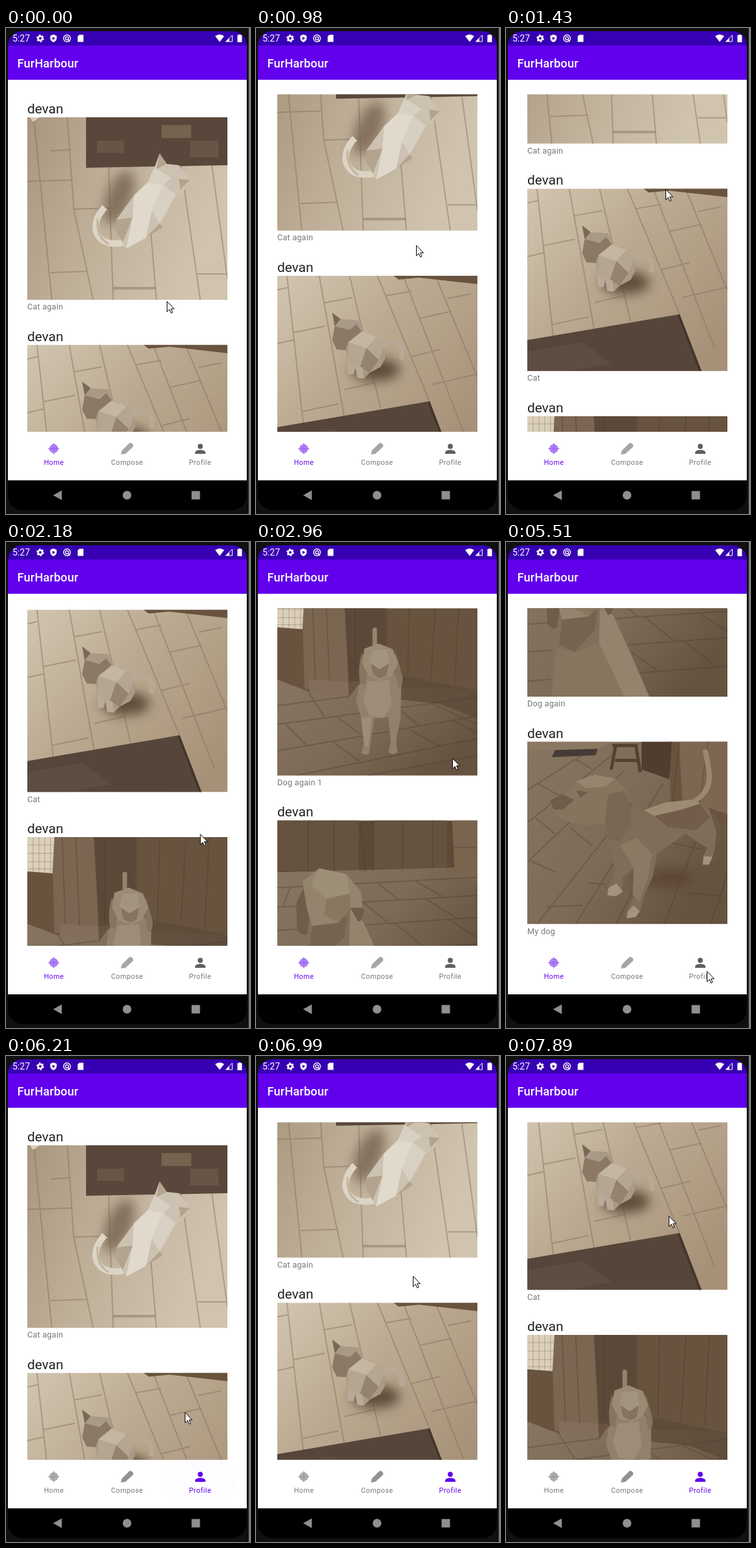
An HTML page that plays this animation: 378x751 px, repeating every 8000 ms.

```html
<!DOCTYPE html>
<html lang="en">
<head>
<meta charset="utf-8">
<title>Pet feed</title>
<style>
html, body { margin: 0; width: 100%; height: 100%; overflow: hidden; background: #101010; }
#stage { display: block; width: 378px; height: 751px; }
text { font-family: Roboto, sans-serif; }
.name { font-size: 21px; fill: #212121; }
.caption { font-size: 12.7px; letter-spacing: .23px; fill: #757575; }
.tab { font-size: 10.9px; letter-spacing: .45px; text-anchor: middle; fill: #757575; }
.tab.on { fill: #6200ee; }
.seam { fill: none; stroke: #806c56; stroke-width: 2; opacity: .45; }
.dark { stroke: #4b3b2f; opacity: .35; }
</style>
</head>
<body>
<svg id="stage" viewBox="0 0 378 751">
  <defs>
    <linearGradient id="lightFloor" x1="0" y1="0" x2="1" y2=".35">
      <stop offset="0" stop-color="#a8967e"/><stop offset=".4" stop-color="#bcac95"/><stop offset="1" stop-color="#d0c4af"/>
    </linearGradient>
    <linearGradient id="catFloor" x1="0" y1="0" x2="1" y2=".8">
      <stop offset="0" stop-color="#d2c6b1"/><stop offset=".45" stop-color="#bbaa91"/><stop offset="1" stop-color="#a69178"/>
    </linearGradient>
    <linearGradient id="dimFloor" x1="0" y1="0" x2="1" y2=".6">
      <stop offset="0" stop-color="#877561"/><stop offset=".55" stop-color="#7d6a57"/><stop offset="1" stop-color="#65523f"/>
    </linearGradient>
    <filter id="soft" x="-50%" y="-50%" width="200%" height="200%"><feGaussianBlur stdDeviation="9"/></filter>
    <clipPath id="screen"><rect x="3" y="5" width="370" height="740" rx="22"/></clipPath>
  </defs>

  <path d="M376 0H378V751H376z" fill="#777"/>
  <g clip-path="url(#screen)">
    <path fill="#fff" d="M3 79H373V700H3z"/>
    <path fill="#3700b3" d="M3 5H373V27H3z"/>
    <path fill="#6200ee" d="M3 27H373V80H3z"/>
    <path d="M3 699H373V745H3z"/>
  </g>

  <g fill="#fff">
    <text x="10" y="21.300" font-size="14">5:27</text>
    <circle cx="53" cy="16" r="3.300" fill="none" stroke="#fff" stroke-width="2.600"/>
    <circle cx="53" cy="16" r="5" fill="none" stroke="#fff" stroke-width="1.800" stroke-dasharray="2.600 2.636"/>
    <path d="M73.500 10L78.500 12V16Q78 20.500 73.500 22Q69 20.500 68.500 16V12z"/>
    <path d="M72 13.500L76.500 16L72 18.500z" fill="#3700b3"/>
    <g fill="none" stroke="#fff" stroke-width="1.400"><circle cx="94.500" cy="16" r="5.300"/><circle cx="94.500" cy="16" r="2.400"/><path d="M96 18L99 21"/></g>
    <path d="M113.500 10.500H120V21.500H111V13z"/>
    <path d="M324 12.500Q331 7.500 338 12.500L331 21.500z"/>
    <path d="M350.500 11V21H340.500z" fill="none" stroke="#fff"/><path d="M346 15.500V21H340.500z"/>
    <path d="M360.500 10H363.500V11H365.500V22H358.500V11H360.500z"/>
    <text x="17.500" y="61" font-size="18.300" font-weight="500" letter-spacing=".15">FurHarbour</text>
  </g>

  <svg x="33" y="102.500" width="310" height="521.500">
    <g id="feed">
      <g data-caption="Cat again">
        <svg width="310" height="282">
          <path fill="url(#lightFloor)" d="M0 0H310V282H0z"/>
          <path class="seam" d="M10 0L38 282M62 0L72 142L102 282M126 75L133 282M190 160L200 282M238 75L268 282M286 75L310 250M0 99L70 97M72 142L130 140M36 240L93 238M264 242H310M36 52L68 50"/>
          <path class="seam" d="M133 264H199" style="stroke-width:4"/>
          <path fill="#d8d0bf" d="M4 0H19L9 7z"/>
          <ellipse cx="142" cy="124" rx="20" ry="44" fill="#6f5b49" opacity=".75" filter="url(#soft)" transform="rotate(22 142 124)"/>
          <path fill="#58473a" d="M91 0H310V74L91 78z"/>
          <path fill="#75624f" d="M208 12H254V32H208z"/>
          <path fill="#685545" d="M108 36H150V55H108zM252 36H296V62H252z"/>
          <path d="M120 139Q104 156 106 174Q113 200 149 194" fill="none" stroke="#dcd4c5" stroke-width="10"/>
          <path d="M109 157Q106 184 126 196" fill="none" stroke="#c1b49f" stroke-width="3"/>
          <path fill="#cdc2b1" d="M205 56L216 72L235 74L252 97L240 117L228 122L216 150L205 164L184 186L153 203L138 178V158L165 121L187 100L197 77z"/>
          <path fill="#e0d9cc" d="M187 100L211 104L193 144L163 155L165 121zM163 155L193 144L184 186L153 203z"/>
          <path fill="#d8d0c2" d="M197 77L223 94L211 104L187 100zM211 104L230 120L205 164L193 144z"/>
          <path fill="#b3a48f" d="M205 56L216 72L200 80zM235 95L252 97L237 112zM205 164L210 170L184 186zM138 158L163 155L148 193L138 178z"/>
        </svg>
      </g>
      <g data-caption="Cat">
        <svg width="310" height="282">
          <path fill="url(#catFloor)" d="M0 0H310V282H0z"/>
          <path class="seam" d="M15 0L42 245M65 0L104 220M112 0L160 205M155 0L236 194M195 0L290 246M245 0L332 210M0 105L26 99M25 88L74 78M0 22L18 18M72 42L116 34M38 210L95 198M104 176L151 165M168 31L208 24M220 66L270 55M208 125L252 114M240 168L310 152M265 35L300 28"/>
          <path fill="#69533f" d="M180 0H310V13L220 3L188 6z"/>
          <ellipse cx="152" cy="145" rx="38" ry="18" fill="#5f4c3a" filter="url(#soft)"/>
          <path fill="#56453a" d="M0 234L236 194L270 282H0z"/>
          <path fill="#67564a" opacity=".5" d="M0 252L85 237L130 270L65 282H0z"/>
          <path fill="#453529" d="M236 194L270 282H266L233 196z"/>
          <path d="M164 108Q177 98 184 105Q197 112 192 129" fill="none" stroke="#b7a995" stroke-width="8"/>
          <path fill="#a99a87" d="M85 57L98 67L126 69L131 86L154 95L166 109L167 128L160 141L143 150L134 159L124 158L121 143L118 152H109V133L106 115L92 114L85 100L89 78z"/>
          <path fill="#8b7966" d="M89 78L112 84L122 75L131 86L110 103L106 115L92 114L85 100z"/>
          <path fill="#796856" d="M85 57L98 67L89 78z"/>
          <path fill="#c3b6a3" d="M110 103L131 86L154 95L138 112z"/>
          <path fill="#b5a692" d="M138 112L154 95L166 109L157 130zM110 103L138 112L128 141L109 133z"/>
          <path fill="#94836f" d="M138 112L157 130L143 150L128 141z"/>
          <path fill="#b8aa97" d="M109 133L121 138L118 152H109zM121 138L132 142L134 159L124 158z"/>
        </svg>
      </g>
      <g data-caption="Dog again 1">
        <svg width="310" height="282">
          <path fill="#68533f" d="M0 0H310V282H0z"/>
          <path fill="#7b6651" d="M38 0H104L111 160L42 148z"/>
          <path fill="#5c4838" d="M103 0H168V130L111 138z"/>
          <path fill="url(#dimFloor)" d="M0 134L48 152L112 160L125 142L310 151V282H0z"/>
          <path fill="#5b4838" d="M185 126L310 151V194L250 171L190 165z" opacity=".75"/>
          <path fill="#826e5a" d="M49 133L109 137L111 161L50 153z"/>
          <path class="seam dark" d="M54 0L59 135M75 0L81 137M120 0V130M170 0V125M205 0L202 126M246 0L238 132M282 0L275 140M0 174L112 160M0 203L310 161M0 244L310 190M30 282L310 225M140 282L310 251M48 152L74 193M12 202L45 235M93 192L130 219M185 177L220 205M240 171L310 203M86 230L128 260M205 211L252 237M270 196L310 216"/>
          <path fill="#dacfba" d="M0 0H42L39 56L0 53z"/>
          <path class="seam" d="M9 0V53M18 0V54M27 0V55M36 0V56M0 12H41M0 25H41M0 38H40M0 49H39" style="stroke-width:1"/>
          <path d="M151 85V57" stroke="#94846e" stroke-width="7" stroke-linecap="round"/>
          <path fill="#91816c" d="M137 125L126 144L122 168L130 193L134 233L130 247Q136 253 142 248L150 194L172 192L176 231L172 246Q180 252 186 246L184 228L191 192L192 146L182 123z"/>
          <path fill="#9d8d78" d="M140 137L173 134L177 173L165 193L142 190L133 165zM130 193L146 192L141 237H135z"/>
          <path fill="#857460" d="M131 93Q124 115 128 139L136 143L141 112zM183 91L194 129Q195 149 187 146L180 111z"/>
          <path fill="#9b8b75" d="M135 86L157 78L179 87L187 109L178 128L160 135L141 128L131 108z"/>
          <path fill="#a39480" d="M148 88L170 87L174 109L158 118L143 108z"/>
          <path fill="#86735f" d="M145 109L158 118L173 109L169 128L159 132L148 126z"/>
        </svg>
      </g>
      <g data-caption="Dog again">
        <svg width="310" height="282">
          <path fill="#5e4938" d="M0 0H310V282H0z"/>
          <path fill="#665240" d="M0 0H126V78H0zM150 0H263V75H150z"/>
          <path fill="url(#dimFloor)" d="M0 80L310 72V282H0z"/>
          <path fill="#79644e" d="M271 0H310V94L275 89z"/>
          <path class="seam dark" d="M48 0V79M88 0V78M128 0L136 80M148 0V78M194 0V75M240 0V75M272 42H310M0 104L310 88M0 134L310 116M0 170L310 150M0 213L310 191M0 258L310 235M155 96L188 123M215 94L258 119M133 127L174 160M230 121L280 152M181 158L230 198M265 153L310 181M150 205L205 244M241 195L295 237M20 104L8 134"/>
          <path fill="#7f6f5b" d="M44 96L39 174L36 282H189L156 204L127 145L115 105z"/>
          <path fill="#94846e" d="M113 135L134 158L189 282H150L111 199z"/>
          <path fill="#75634f" d="M54 163L109 148L104 180L73 213L49 201z"/>
          <path fill="#87755f" d="M45 206L73 213L111 199L150 282H38z"/>
          <path fill="#6f5d4a" d="M40 105L29 129L31 169Q39 181 46 175L51 144zM117 105L134 139Q132 157 125 156L111 131z"/>
          <path fill="#94846e" d="M39 94L65 74L107 83L130 110L132 135L113 135L95 158L54 163L46 137z"/>
          <path fill="#9d8e78" d="M65 74L107 83L113 113L77 121L52 101z"/>
          <path fill="#89785f" d="M77 121L113 113L113 135L95 158L72 145z"/>
        </svg>
      </g>
      <g data-caption="My dog">
        <svg width="310" height="282">
          <path fill="url(#dimFloor)" d="M0 0H310V282H0z"/>
          <path class="seam dark" d="M0 75L90 18M0 125L135 18M0 186L150 45M15 282L163 95M75 282L210 65M138 282L240 72M212 282L272 125M284 282L310 205M17 65L51 84M11 116L43 143M2 183L45 202M66 133L100 160M30 255L86 253M207 205L242 211M250 234L300 239M94 218L121 221M222 156L268 166M76 28L100 42"/>
          <path fill="#69533f" d="M220 0H310V133L278 103L222 92z"/>
          <path fill="#7d6752" d="M235 0H310V112L240 89z"/>
          <path fill="#503d2f" d="M177 0H224L220 58L177 43z"/>
          <path fill="#8b7862" d="M0 0H130L112 11L0 14z"/>
          <path fill="#443c35" d="M43 13L109 11L106 21L38 24z"/>
          <path d="M132 6H171M137 5L130 43M168 5L175 47M136 29H170" fill="none" stroke="#554132" stroke-width="5"/>
          <path class="seam dark" d="M236 0L225 94M280 0L267 95"/>
          <ellipse cx="211" cy="211" rx="50" ry="14" fill="#56412f" opacity=".7" filter="url(#soft)"/>
          <path d="M255 94Q283 80 282 52Q280 32 276 16" fill="none" stroke="#9a8872" stroke-width="8" stroke-linecap="round"/>
          <path fill="#806d59" d="M143 100L181 104L213 94L260 89L282 105L293 140L290 169L282 190H272L273 176L279 164L262 154L246 142L201 173L195 207L181 238L174 264L156 274Q149 268 155 262L165 239V196L148 209L146 234L128 240Q119 234 126 226L136 199L123 143z"/>
          <path fill="#9d8b74" d="M181 106L213 94L260 89L268 96L239 105L197 115z"/>
          <path fill="#715d49" d="M197 115L239 105L268 96L283 117L261 137L218 132z"/>
          <path fill="#8b7963" d="M143 160L169 149L194 174L186 213L173 247L163 235L165 195z"/>
          <path fill="#a39480" d="M156 262L165 253L174 262L168 271L154 273zM126 226L138 219L148 232L137 239L124 237zM273 177L287 178L281 190H272z"/>
          <path fill="#87745f" d="M35 91L55 81L76 61L105 51L136 57L153 76L153 101L127 127L86 129L52 121L39 107z"/>
          <path fill="#97866f" d="M76 61L105 51L136 57L122 69L91 72z"/>
          <path fill="#705d49" d="M35 91L55 81L73 90L55 105L41 105zM76 75L95 78L82 87z"/>
          <path fill="#7a6753" d="M125 81L150 76L161 105L161 130L143 155L127 151L120 123z"/>
        </svg>
      </g>
    </g>
  </svg>

  <svg x="244" y="624" width="114" height="60"><circle id="ripple" cx="57" cy="36" fill="#6200ee"/></svg>
  <g id="homeIcon">
    <circle cx="74" cy="650" r="5.500" fill="currentColor" opacity=".8"/>
    <circle cx="74" cy="650" r="6" fill="none" stroke="currentColor" stroke-width="1.500"/>
    <path d="M74 641.500V658.500M65.500 650H82.500" stroke="currentColor" stroke-width="1.500"/>
    <circle cx="74" cy="650" r="2.800" fill="currentColor"/>
  </g>
  <path id="pencil" d="M178 659L179.500 653L190.500 642Q192.500 640 195 642L196.500 643.500Q198 646 196 648L185 658z"/>
  <g id="person"><circle cx="301" cy="646.500" r="3.900"/><path d="M293 658V655.500Q294 652 301 652T309 655.500V658z"/></g>
  <text class="tab" x="74.200" y="674.500">Home</text>
  <text class="tab" x="187.700" y="674.500">Compose</text>
  <text class="tab" x="300.800" y="674.500">Profile</text>

  <g fill="#8f8f8f"><path d="M86.500 714.500V729.500L73 722zM287.500 715.500H300.500V728.500H287.500z"/><circle cx="187.500" cy="722" r="6.700"/></g>
  <path id="cursor" d="M.5.5V16.500L4.200 13L6.700 18.500L9 17.500L6.700 12H11.500z" fill="#fff" stroke="#000"/>
</svg>

<script>
const LOOP = 8000, PITCH = 351.5, TAP = 5790;
const $ = id => document.getElementById(id);

// [first change, last change, number of changes]
const bursts = [
  [560, 1550, 8], [1670, 2660, 9], [2810, 3800, 8], [3920, 4850, 8],
  [4970, 5510, 5], [5790, 6720, 8], [6870, 7890, 9]
];
// [time, scroll]
const scrollKeys = [
  [560, 0], [900, 80], [1408, 241], [1600, 285], [2250, 400], [2600, 560],
  [2951, 762], [3200, 890], [3450, 985], [3800, 1235.5], [TAP - 1, 1235.5],
  [TAP, 0], [6680, 0], [6870, 63], [6997, 108], [7300, 232], [7890, 410]
];
// [time, x, y]
const cursorKeys = [
  [560, 249, 422], [1408, 247, 249], [1600, 248, 238], [2100, 300, 450], [2400, 303, 455],
  [2951, 304, 334], [3180, 300, 250], [3450, 282, 400], [3800, 269, 193], [3920, 269, 193],
  [4850, 337, 505], [5510, 311, 663], [TAP, 311, 663], [6550, 246, 448], [6720, 245, 438],
  [6870, 244, 385], [6997, 243, 340], [7300, 245, 225], [7890, 252, 247]
];

function addText(parent, className, y, content) {
  const text = document.createElementNS("http://www.w3.org/2000/svg", "text");
  text.setAttribute("class", className);
  text.setAttribute("y", y);
  text.textContent = content;
  parent.append(text);
}

[...$("feed").children].forEach((post, i) => {
  post.setAttribute("transform", `translate(0 ${35.5 + PITCH * i})`);
  addText(post, "name", -6, "devan");
  addText(post, "caption", 297, post.dataset.caption);
});

function snap(t) {
  let held = 0;
  for (const [start, end, count] of bursts) {
    if (t < start) break;
    const gap = (end - start) / (count - 1);
    held = Math.min(end, start + Math.floor((t - start + 10) / gap) * gap);
  }
  return held;
}

function sample(keys, t) {
  const next = keys.findIndex(key => key[0] > t);
  if (next === 0) return keys[0].slice(1);
  if (next < 0) return keys[keys.length - 1].slice(1);
  const a = keys[next - 1], b = keys[next];
  const k = (t - a[0]) / (b[0] - a[0]);
  return a.slice(1).map((v, i) => v + (b[i + 1] - v) * k);
}

const tabs = document.querySelectorAll(".tab");

function draw(now) {
  const t = snap(now % LOOP);
  const [scroll] = sample(scrollKeys, t);
  const [x, y] = sample(cursorKeys, t);
  const onProfile = t >= TAP;
  $("feed").setAttribute("transform", `translate(0 ${-scroll})`);
  $("cursor").setAttribute("transform", `translate(${x} ${y})`);
  tabs[0].classList.toggle("on", !onProfile);
  tabs[2].classList.toggle("on", onProfile);
  $("homeIcon").style.color = onProfile ? "#a0a0a0" : "#a16bf3";
  $("pencil").style.fill = onProfile ? "#929292" : "#a6a6a6";
  $("person").style.fill = onProfile ? "#6200ee" : "#5f5f5f";
  const k = (t - TAP) / 450;
  const rippling = k >= 0 && k < 1;
  $("ripple").setAttribute("r", rippling ? 25 + 32 * k : 0);
  $("ripple").setAttribute("opacity", rippling ? .12 * (1 - k) : 0);
}

const begin = performance.now();
function tick() {
  draw(performance.now() - begin);
  requestAnimationFrame(tick);
}
tick();
</script>
</body>
</html>
```
